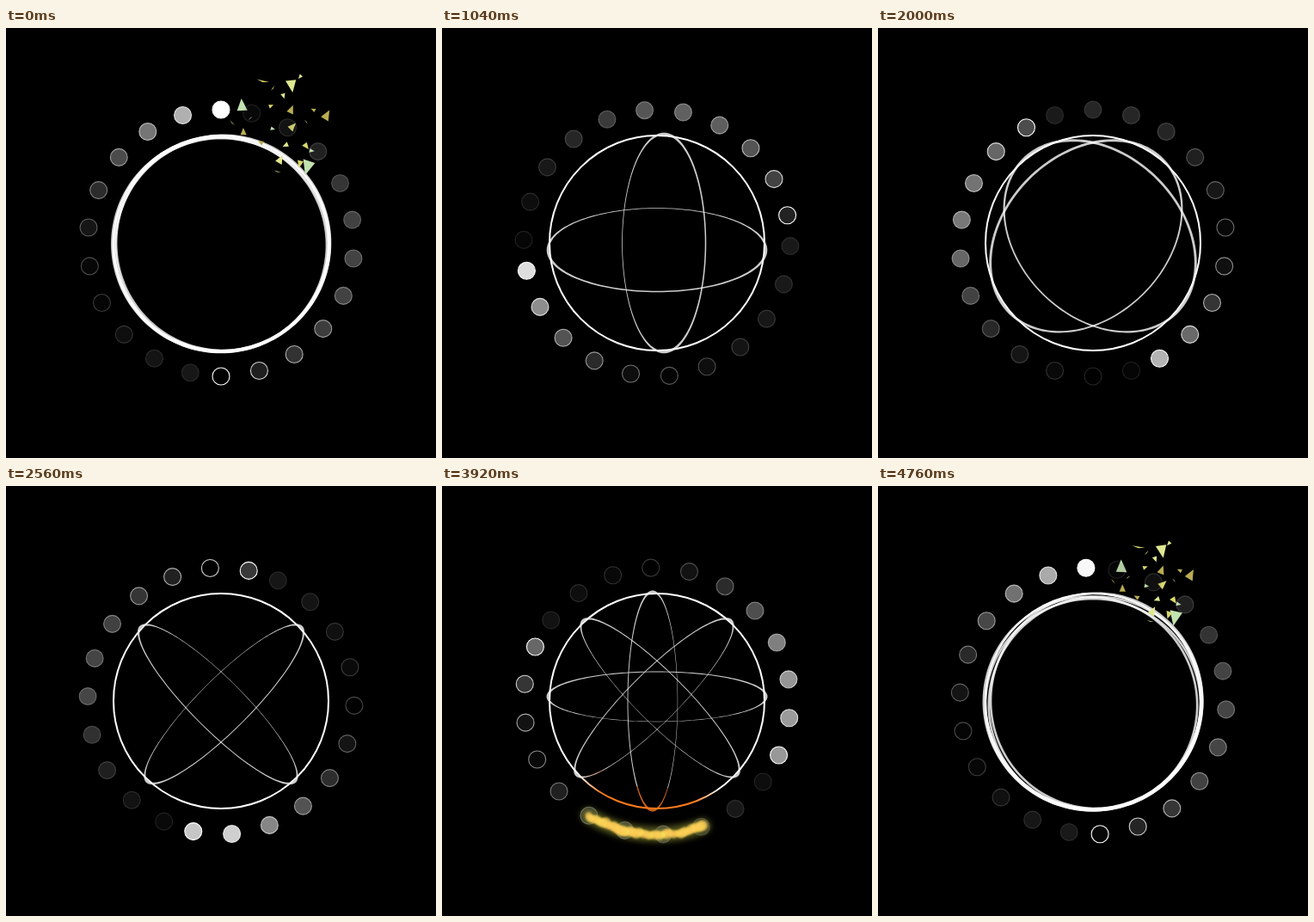
Write an HTML page with a canvas that moves like this. It is 500 px wide and 500 px high and loops after 4.8 s.

```html
<!DOCTYPE html>
<html>
<head>
<meta charset="utf-8">
<style>
  html, body { margin: 0; width: 100%; height: 100%; overflow: hidden; background: #000; }
  canvas { display: block; width: 500px; height: 500px; }
</style>
</head>
<body>
<canvas id="stage" width="500" height="500"></canvas>
<script>
const ctx = document.getElementById('stage').getContext('2d');
const TAU = Math.PI * 2, DEG = Math.PI / 180;
const CENTER = 250, ORBIT = 155, FRAMES = 120, STEP = 40, DEPTH = 700;

const wrap = f => ((f % FRAMES) + FRAMES) % FRAMES;

function seeded(seed) {
  return () => {
    seed = (seed * 1664525 + 1013904223) >>> 0;
    return seed / 4294967296;
  };
}

// Clockwise degrees from the top to a point near the orbit.
function onOrbit(deg, radius = ORBIT) {
  return [CENTER + radius * Math.sin(deg * DEG), CENTER - radius * Math.cos(deg * DEG)];
}

function disc(x, y, radius) {
  ctx.beginPath();
  ctx.arc(x, y, radius, 0, TAU);
}

// A circle turned by `tilt` about an axis in its plane, seen in perspective.
function addTiltedCircle(radius, axis, tilt) {
  const c = Math.cos(tilt), s = Math.sin(tilt), ca = Math.cos(axis), sa = Math.sin(axis);
  for (let i = 0; i < 160; i++) {
    const u = i / 160 * TAU;
    const scale = DEPTH / (DEPTH - radius * Math.sin(u) * s);
    const a = radius * Math.cos(u) * scale, b = radius * Math.sin(u) * c * scale;
    const x = CENTER + a * ca - b * sa, y = CENTER + a * sa + b * ca;
    i ? ctx.lineTo(x, y) : ctx.moveTo(x, y);
  }
  ctx.closePath();
}

function drawRing(axisDeg, tilt) {
  ctx.beginPath();
  addTiltedCircle(126.5, axisDeg * DEG, tilt);
  addTiltedCircle(123.7, axisDeg * DEG, tilt);
  ctx.fill('evenodd');
}

// Upright rings flip first, then the diagonal ones, then all four.
function drawRings(f) {
  const turn = wrap(f - 1);
  const phase = Math.floor(turn / 40);
  const tilt = (182 - 4.39 * (turn % 40 + 1)) * DEG;
  ctx.strokeStyle = '#fff';
  ctx.lineWidth = 2;
  disc(CENTER, CENTER, 125);
  ctx.stroke();
  ctx.fillStyle = 'rgba(255,255,255,.8)';
  if (phase !== 1) [0, -90].forEach(axis => drawRing(axis, tilt));
  if (phase !== 0) [45, -45].forEach(axis => drawRing(axis, tilt));
}

// The comet runs once round the orbit, between the two bursts.
const COMET = { start: 80.5, end: 116, from: 6, sweep: 381, lag: 4.5 };

function cometAngle(f) {
  const u = Math.min(1, Math.max(0, (f - COMET.start) / (COMET.end - COMET.start)));
  return COMET.from + COMET.sweep * (u + 0.045 * Math.sin(Math.PI * u) ** 2);
}

// Multiplying tints the white lines and leaves the black alone.
function heatRings(tail, head) {
  const margin = 15, span = head - tail + 2 * margin;
  const tint = ctx.createConicGradient((tail - margin - 90) * DEG, CENTER, CENTER);
  const soft = margin / 360, end = span / 360;
  tint.addColorStop(0, '#fff');
  tint.addColorStop(soft, '#ff7a1e');
  tint.addColorStop(end - soft, '#ff7a1e');
  tint.addColorStop(end, '#fff');
  ctx.save();
  ctx.globalCompositeOperation = 'multiply';
  ctx.strokeStyle = tint;
  ctx.lineWidth = 28;
  disc(CENTER, CENTER, 116);
  ctx.stroke();
  ctx.restore();
}

function drawComet(tail, head, f) {
  const rand = seeded(f);
  ctx.save();
  ctx.lineCap = 'round';
  ctx.lineWidth = 18;
  ctx.strokeStyle = 'rgba(130,135,45,.6)';
  ctx.filter = 'blur(3px)';
  ctx.beginPath();
  ctx.arc(CENTER, CENTER, ORBIT, (tail - 90) * DEG, (head - 90) * DEG);
  ctx.stroke();
  ctx.filter = 'blur(1px)';
  for (let deg = tail; deg < head; deg += 1) {
    const [x, y] = onOrbit(deg, ORBIT + (rand() - 0.5) * 4);
    ctx.fillStyle = `hsla(${40 + rand() * 8},100%,67%,.7)`;
    disc(x, y, 3.5 + rand() * 2.5);
    ctx.fill();
  }
  ctx.restore();
}

function makeBurst(start, at, count, radius, colors, seed) {
  const rand = seeded(seed);
  const shards = Array.from({ length: count }, (_, i) => ({
    heading: i * 2.4 + rand(),
    distance: radius * Math.sqrt((i + rand()) / count),
    size: 3 + 7 * rand() ** 2,
    facing: rand() * TAU,
    spin: (rand() - 0.5) * 0.2,
    sliver: rand() < 0.3,
    color: colors[i % colors.length]
  }));
  return { start, at, shards };
}

const BURSTS = [
  makeBurst(116, 27.4, 24, 60, ['#d9d76a', '#c2e2b0', '#b9ac52', '#e0e890'], 7),
  makeBurst(79, 6, 15, 42, ['#ffab66', '#ff9850', '#ffc488', '#e8c84c'], 3)
];

const spread = age => 1 - Math.exp(-0.2 * age);

function drawShard(x, y, size, facing, sliver) {
  const corners = sliver ? [[0, 1], [178, 1], [90, 0.25]] : [[0, 1.15], [130, 1], [232, 0.95]];
  ctx.beginPath();
  for (const [turn, reach] of corners) {
    const a = facing + turn * DEG;
    ctx.lineTo(x + size * reach * Math.cos(a), y + size * reach * Math.sin(a));
  }
  ctx.fill();
}

function drawBurst({ start, at, shards }, f) {
  const age = wrap(f - start), life = 16;
  if (age === 0 || age >= life) return;
  const [cx, cy] = onOrbit(at);
  const reach = spread(age) / spread(4);
  const shrink = Math.min(1, 1.3 * (1 - age / life));
  for (const s of shards) {
    const d = s.distance * reach;
    ctx.fillStyle = s.color;
    drawShard(cx + d * Math.cos(s.heading), cy + d * Math.sin(s.heading),
      s.size * shrink, s.facing + s.spin * age, s.sliver);
  }
}

// Brightness swings linearly between white and black at these frames.
const SWINGS = [0, 30, 58.5, 83, 120];

function glowAt(f) {
  const i = SWINGS.findIndex(end => f < end) - 1;
  const u = (f - SWINGS[i]) / (SWINGS[i + 1] - SWINGS[i]);
  return i % 2 ? u : 1 - u;
}

// Two opposite chains of dots; each dot repeats its leader later and fainter.
function drawDots(f) {
  const gap = 50 / 3;
  ctx.save();
  ctx.strokeStyle = '#fff';
  ctx.lineWidth = 1.1;
  for (let i = 0; i < 11; i++) {
    const glow = glowAt(wrap(f - i * gap / 3));
    ctx.globalAlpha = 0.81 ** i;
    for (const side of [0, 1]) {
      const v = Math.round(255 * (side ? 1 - glow : glow));
      const [x, y] = onOrbit(f * 3 + side * 180 - i * gap);
      ctx.fillStyle = `rgb(${v},${v},${v})`;
      disc(x, y, 10);
      ctx.fill();
      ctx.stroke();
    }
  }
  ctx.restore();
}

function draw(f) {
  const tail = cometAngle(f - COMET.lag), head = cometAngle(f);
  const flying = f > COMET.start && f <= COMET.end;
  ctx.fillStyle = '#000';
  ctx.fillRect(0, 0, 500, 500);
  drawRings(f);
  if (flying) heatRings(tail, head);
  BURSTS.forEach(burst => drawBurst(burst, f));
  drawDots(f);
  if (flying) drawComet(tail, head, f);
}

function tick() {
  draw(Math.floor(performance.now() / STEP) % FRAMES);
  requestAnimationFrame(tick);
}
tick();
</script>
</body>
</html>
```
